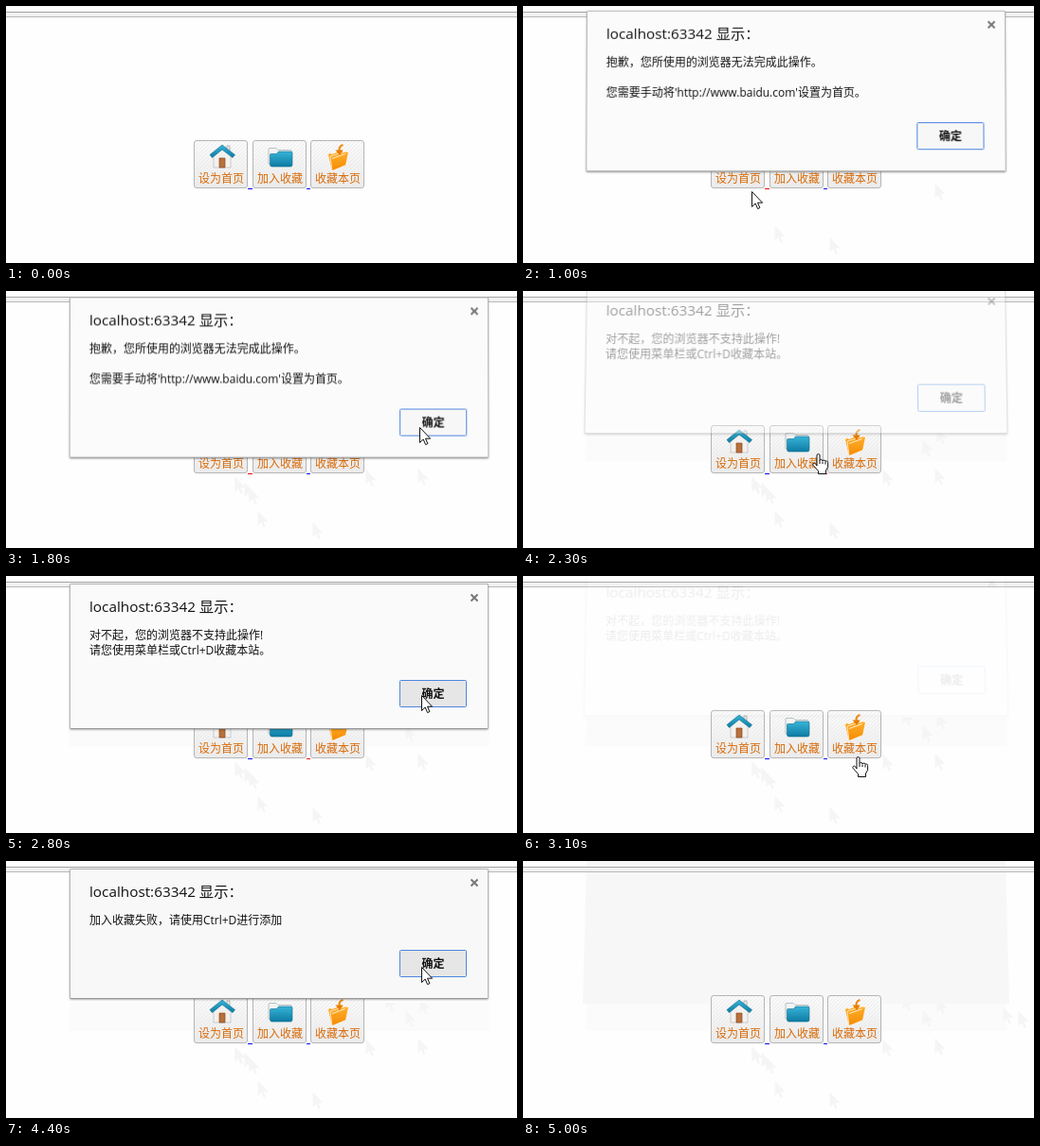
Write an HTML page that moves like this. It is 539 by 272 pixels and loops after 5300 ms.

```html
<!DOCTYPE html>
<html lang="zh-CN">
<head>
<meta charset="utf-8">
<title>收藏</title>
<style>
html, body { margin: 0; width: 100%; height: 100%; overflow: hidden; background: #fefefe; }
#stage { position: relative; width: 539px; height: 272px; overflow: hidden; }
svg { position: absolute; left: 0; top: 0; overflow: visible; }
text { font-family: "Open Sans", "Noto Sans CJK SC", "Noto Sans CJK", sans-serif; font-size: 12px; fill: #111; white-space: pre; }
.label { font-family: "Noto Sans CJK SC", "Noto Sans CJK", sans-serif; fill: #d86a08; }
.title { font-size: 15.3px; }
.dialog { position: absolute; left: 67px; top: 8px; width: 440px; border: 1px solid #b4b4b4; border-bottom-color: #999;
  border-radius: 2px; box-shadow: 0 1px 2px rgba(0,0,0,.3); transform-origin: 50% 0; visibility: hidden; }
.ok { font-weight: bold; }
</style>
</head>
<body>
<div id="stage">
  <svg id="page" width="539" height="272">
    <defs>
      <linearGradient id="face" x2="0" y2="1"><stop stop-color="#fbfbfb"/><stop offset="1" stop-color="#ececec"/></linearGradient>
      <linearGradient id="blue" x2="0" y2="1"><stop stop-color="#38b4d8"/><stop offset="1" stop-color="#0d7ba3"/></linearGradient>
      <linearGradient id="orange" x2="0" y2="1"><stop stop-color="#ffb02e"/><stop offset="1" stop-color="#f58a00"/></linearGradient>
      <pattern id="hatch" width="4" height="4" patternUnits="userSpaceOnUse"><path d="M0 4L4 0" stroke="#e6e6e6" stroke-width=".7"/></pattern>
      <clipPath id="below"><path d="M0 150H539V272H0z"/></clipPath>
    </defs>
    <path id="band" d="M67 150H510V180H66z" fill="#fbfbfb"/>
    <path id="stain" d="M67 0H509L513 151H63z" fill="#f7f7f7"/>
    <path d="M0 7H539V11H0z" fill="#f1f1f1"/>
    <path d="M0 6.5H539" stroke="#a3a3a3"/>
    <path d="M0 11.5H539" stroke="#b9b9b9"/>
    <g id="trail" fill="#f5f5f5" clip-path="url(#below)"></g>
    <g id="buttons"></g>
  </svg>
</div>
<script>
const LOOP = 5300;
const ARROW = 'M.5 .5V16.5L4.2 13L6.6 18.6L8.9 17.6L6.5 12.2H11.6z';
const HAND = 'M5 13V2a1.5 1.5 0 0 1 3 0V7.5a1.5 1.2 0 0 1 3 .5a1.5 1.2 0 0 1 3 .6a1.4 1.2 0 0 1 2.6 .8V14.5L14.5 18V21.5H6.5V18.5L1 12.3a1.5 1.5 0 0 1 2.3-1.8z';

// time, x, y, kind (no kind: hidden)
const pointer = [
  [0, 0, 0], [200, 434, 187, 'arrow'], [300, 323, 244, 'arrow'], [400, 265, 232, 'arrow'],
  [500, 241, 196, 'arrow'], [600, 238, 181, 'hand'],
  [1000, 241, 196, 'arrow'], [1300, 251, 202, 'arrow'], [1400, 256, 207, 'arrow'],
  [1500, 379, 188, 'arrow'], [1600, 436, 144, 'arrow'], [2000, 421, 157, 'arrow'],
  [2100, 312, 178, 'hand'], [2200, 310, 172, 'hand'],
  [2600, 333, 160, 'arrow'], [2700, 400, 140, 'arrow'], [2800, 438, 126, 'arrow'],
  [3100, 352, 191, 'hand'], [3300, 350, 184, 'hand'], [3400, 347, 180, 'hand'],
  [3700, 384, 155, 'hand'], [3800, 412, 132, 'arrow'], [3900, 438, 112, 'arrow'],
  [4700, 446, 119, 'arrow'], [4800, 506, 154, 'arrow'], [4900, 522, 158, 'arrow'], [5000, 0, 0]
];

// time, dialog, how far it is tilted away
const poses = [
  [0, -1, 0], [1000, 0, .2], [1100, 0, 0], [1800, 0, .1], [1900, 0, .4], [2000, 0, .95], [2100, -1, 0],
  [2300, 1, .75], [2400, 1, .2], [2500, 1, 0], [2900, 1, .1], [3000, 1, .4], [3100, 1, .95], [3200, -1, 0],
  [3600, 2, .75], [3700, 2, 0], [4500, 2, .1], [4600, 2, .35], [4700, -1, 0]
];

const specs = [
  { h: 168, fill: '#fbfbfb', step: 32, lines: ['抱歉，您所使用的浏览器无法完成此操作。', "您需要手动将'http://www.baidu.com'设置为首页。"] },
  { h: 152, fill: '#fafafa', step: 16, lines: ['对不起，您的浏览器不支持此操作!', '请您使用菜单栏或Ctrl+D收藏本站。'] },
  { h: 136, fill: '#f8f8f8', step: 16, lines: ['加入收藏失败，请使用Ctrl+D进行添加'] }
];

const icons = [
  `<path d="M233 148h3v8h-3z" fill="#eee" stroke="#999" stroke-width=".7"/>
   <path d="M219 158L228 150L237 158V171H219z" fill="#f3f1ee" stroke="#bbb" stroke-width=".7"/>
   <path d="M225 161h6v10h-6z" fill="#b8703c" stroke="#8a4a20" stroke-width=".7"/>
   <path d="M215 157.5L228 147L241.500 157.500L239 160.500L228 152L217.500 160.500z" fill="url(#blue)" stroke="#0e6e90" stroke-width=".6"/>`,
  `<path d="M277 167V151.500q0-1 1-1h7l2 2h13q1 0 1 1V167z" fill="#f4f4f4" stroke="#a8b4b8" stroke-width=".8"/>
   <path d="M278.500 157.500q0-1 1-1h6l2-2.500h13q1.500 0 1.500 1.500V168q0 2-2 2h-19.500q-2 0-2-2z" fill="url(#blue)" stroke="#0d6c8d" stroke-width=".6"/>`,
  `<g fill="url(#orange)" stroke="#fff" stroke-width=".7">
   <path d="M339.500 157L342 155.500L344 156.500L355 152L358 167L343.500 174.500z"/>
   <path d="M342 159L358 154L361.500 154.500L358.500 168.500L344 174.500z"/></g>
   <path d="M344 161.500L357.500 156.500" stroke="#fff" stroke-width=".8"/>
   <path d="M355.500 147Q351 148 351.500 154" fill="none" stroke="#f08a10" stroke-width="2.200"/>
   <path d="M347.500 152.500L352 158L355.500 152.500z" fill="#e67c00"/>`
];

const $ = id => document.getElementById(id);
const stage = $('stage');

$('buttons').innerHTML = ['设为首页', '加入收藏', '收藏本页'].map((name, i) => {
  const x = [198, 260, 321][i];
  const box = `x="${x + .5}" y="142.500" width="56" height="50" rx="2.500"`;
  const link = i < 2 ? `<path id="link${i}" d="M${x + 57} 193.500h${5 - i}" stroke="#00e"/>` : '';
  return `<rect ${box} fill="url(#face)"/><rect ${box} fill="url(#hatch)" stroke="#b5b5b5"/>
    ${icons[i]}<text class="label" x="${x + 5}" y="187">${name}</text>${link}`;
}).join('');

const dialogs = specs.map(({ h, fill, step, lines }) => {
  const box = document.createElement('div');
  box.className = 'dialog';
  box.style.height = h + 'px';
  box.style.background = fill;
  const rows = lines.map((line, i) => `<text x="20" y="${58 + i * step}">${line}</text>`).join('');
  box.innerHTML = `<svg width="440" height="${h}">
    <text class="title" x="20" y="29">localhost:63342 显示：</text>${rows}
    <path d="M422.500 10.500l7 7m0-7l-7 7" stroke="#777" stroke-width="2"/>
    <rect class="key" x="347.500" y="${h - 50.5}" width="70" height="28" rx="1" fill="#f7f7f7" stroke="#4d86e0"/>
    <text class="ok" x="382.500" y="${h - 32}" text-anchor="middle">确定</text></svg>`;
  stage.append(box);
  return box;
});

stage.insertAdjacentHTML('beforeend', `<svg width="539" height="272">
  <path id="arrow" d="${ARROW}" fill="#fff" stroke="#111" stroke-linejoin="round"/>
  <g id="hand"><path d="${HAND}" fill="#fff" stroke="#111" stroke-linejoin="round"/>
  <path d="M8 7.500V11M11 8.500V11M14 9V11.500" stroke="#111"/></g></svg>`);

// Each place the arrow has rested stays faintly visible.
const marks = pointer.filter(p => p[3] === 'arrow');
$('trail').innerHTML = marks.map(([, x, y]) => `<path d="${ARROW}" transform="translate(${x} ${y})"/>`).join('');
const prints = [...$('trail').children];

const at = (table, t) => table.findLast(row => row[0] <= t);
const show = (el, on) => { el.style.visibility = on ? 'visible' : 'hidden'; };
const within = (t, a, b) => t >= a && t < b;

function draw() {
  const t = performance.now() % LOOP;
  const [, x, y, kind] = at(pointer, t);
  for (const id of ['arrow', 'hand']) {
    show($(id), id === kind);
    $(id).setAttribute('transform', `translate(${x - (id === 'hand' ? 5 : 0)} ${y})`);
  }
  const [, open, tilt] = at(poses, t);
  dialogs.forEach((box, i) => {
    show(box, i === open);
    box.style.opacity = Math.min(1, (1 - tilt) * 1.6);
    box.style.transform = tilt ? `translateY(${-16 * tilt}px) perspective(1000px) rotateX(${5.5 * tilt}deg)` : 'none';
    const pressed = within(t, 1600, 1800) || within(t, 2800, 2900) || within(t, 3900, 4500);
    box.querySelector('.key').setAttribute('fill', pressed ? '#e6e6e6' : '#f7f7f7');
  });
  prints.forEach((print, i) => show(print, t >= marks[i][0] + 100));
  show($('band'), t >= 2100);
  show($('stain'), t >= 4700);
  $('link0').setAttribute('stroke', within(t, 800, 2100) ? '#e00' : '#00e');
  $('link1').setAttribute('stroke', within(t, 2200, 3000) ? '#e00' : '#00e');
  requestAnimationFrame(draw);
}
draw();
</script>
</body>
</html>
```
